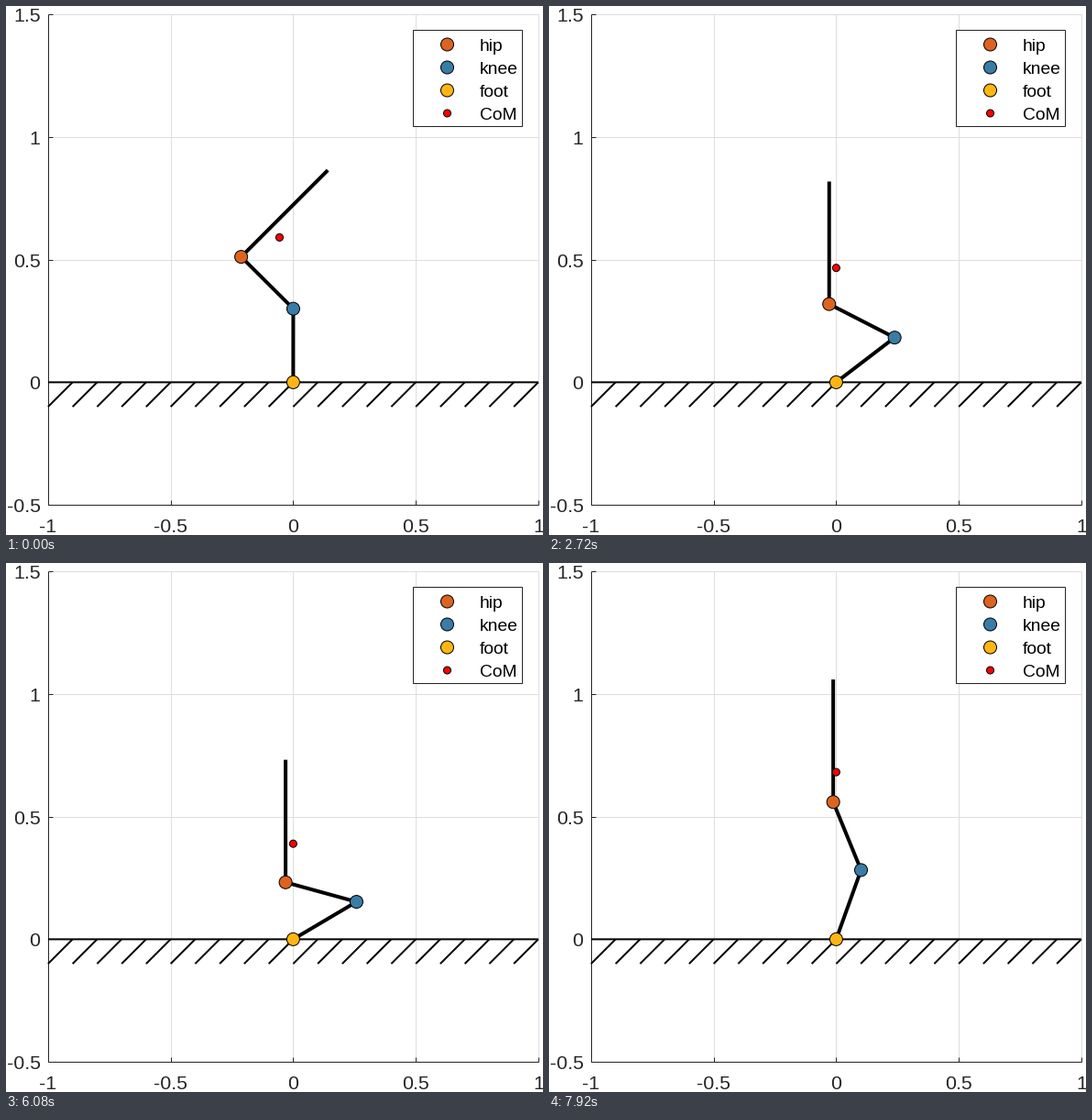
These frames come from a looping animation (586x577 px, 8000 ms). A matplotlib script:

```python
import numpy as np
import matplotlib.pyplot as plt
from matplotlib.animation import FuncAnimation
from matplotlib.patches import Circle, Rectangle

WIDTH, HEIGHT, DPI = 586, 577, 64
FRAMES, INTERVAL = 100, 80
INK = "#262626"
HIP, KNEE, FOOT, COM = "#DC6420", "#3A7CA5", "#FFB512", "#FF0000"

# Link lengths, and how far each link direction carries the centre of mass
SHANK, THIGH, TRUNK = 0.3, 0.3, 0.5
C_SHANK, C_THIGH, C_TRUNK = 0.286, 0.2553, 0.1765

# Phase (degrees) of the squat cycle against time (seconds)
PHASE_T = np.array([0, 0.6, 1.04, 2.72, 3.84, 6.08, 7.36, 7.92])
PHASE = np.array([0, 17, 35.5, 99.6, 142.9, 236.6, 300.7, 335.5])
PHASE_RATE = np.gradient(PHASE, PHASE_T)


def pt(px):
    return px * 72 / DPI


def to_x(x):
    return 313.4 + 267.5 * np.asarray(x)


def to_y(y):
    return 410.4 - 267.3 * np.asarray(y)


def phase(t):
    """Cubic Hermite interpolation of the cycle phase, in radians."""
    i = int(np.clip(np.searchsorted(PHASE_T, t) - 1, 0, len(PHASE_T) - 2))
    h = PHASE_T[i + 1] - PHASE_T[i]
    s = (t - PHASE_T[i]) / h
    deg = ((1 + 2 * s) * (1 - s) ** 2 * PHASE[i]
           + s * (1 - s) ** 2 * h * PHASE_RATE[i]
           + s * s * (3 - 2 * s) * PHASE[i + 1]
           + s * s * (s - 1) * h * PHASE_RATE[i + 1])
    return np.radians(deg)


def settle(t, rate):
    """Critically damped decay from 1 to 0."""
    return (1 + rate * t) * np.exp(-rate * t)


def direction(angle):
    return np.array([np.cos(angle), np.sin(angle)])


def pose(t):
    """Joint positions (foot, knee, hip, head) and centre of mass."""
    com = np.array([-0.0558 * settle(t, 4.1),
                    0.5 + 0.2 * np.cos(phase(t)) - 0.109 * settle(t, 8)])
    trunk = direction(np.pi / 2 - np.pi / 4 * settle(t, 3.75))

    # Two-link inverse kinematics for the legs, knee bent forward
    reach = com - C_TRUNK * trunk
    dist = np.hypot(*reach)
    cos_bend = (C_SHANK**2 + dist**2 - C_THIGH**2) / (2 * C_SHANK * dist)
    shank = direction(np.arctan2(reach[1], reach[0])
                      - np.arccos(np.clip(cos_bend, -1, 1)))
    thigh = reach - C_SHANK * shank
    thigh /= np.hypot(*thigh)

    foot = np.zeros(2)
    knee = foot + SHANK * shank
    hip = knee + THIGH * thigh
    return np.array([foot, knee, hip, hip + TRUNK * trunk]), com


fig = plt.figure(figsize=(WIDTH / DPI, HEIGHT / DPI), dpi=DPI, facecolor="white")
ax = fig.add_axes([0, 0, 1, 1])
ax.set_xlim(0, WIDTH)
ax.set_ylim(HEIGHT, 0)
ax.axis("off")


def stroke(x, y, width, color="black", z=2, snap=None):
    line, = ax.plot(x, y, color=color, lw=pt(width), zorder=z, snap=snap,
                    solid_capstyle="butt", solid_joinstyle="miter")
    return line


def dot(x, y, size, color, z):
    return ax.add_patch(Circle((x, y), size / 2, fc=color, ec="black",
                               lw=pt(1), zorder=z))


def label(x, y, text, size, color, ha):
    ax.text(x, y, text, family="Liberation Sans", fontsize=pt(size),
            color=color, ha=ha, va="baseline", zorder=12)


def draw_axes():
    left, right = to_x([-1, 1])
    bottom, top = to_y([-0.5, 1.5])
    for v in np.arange(-1, 1.01, 0.5):
        x = to_x(v)
        stroke([x, x], [top, bottom], 1, "#DEDEDE", 1)
        stroke([x, x], [bottom, bottom - 5.4], 1, INK)
        label(x, 573.7, f"{v:g}", 21.33, INK, "center")
    for v in np.arange(-0.5, 1.51, 0.5):
        y = to_y(v)
        stroke([left, right], [y, y], 1, "#DEDEDE", 1)
        stroke([left, left + 5.4], [y, y], 1, INK)
        label(37.5, y + 7.9, f"{v:g}", 21.33, INK, "right")
    stroke([left, left], [top, bottom], 1, INK)
    stroke([left, right], [bottom, bottom], 1, INK)


def draw_ground():
    stroke(to_x([-1, 1]), to_y([0, 0]), 2, z=3, snap=False)
    for x in np.linspace(-0.9, 1, 20):
        stroke(to_x([x, x - 0.1]), to_y([0, -0.1]), 2, z=3)


def draw_legend():
    ax.add_patch(Rectangle((444, 26), 119, 105, fc="white", ec=INK,
                           lw=pt(1), zorder=10))
    rows = [("hip", HIP, 14), ("knee", KNEE, 14), ("foot", FOOT, 14), ("CoM", COM, 8)]
    for i, (name, color, size) in enumerate(rows):
        y = 42 + 25 * i
        dot(481.5, y, size, color, 11)
        label(517, y + 6.7, name, 19.2, "black", "left")


draw_axes()
draw_ground()
draw_legend()

body = stroke([], [], 4, z=5)
joints = [dot(0, 0, 14, color, 6) for color in (FOOT, KNEE, HIP)]
com_dot = dot(0, 0, 8, COM, 7)


def update(frame):
    points, com = pose(frame * INTERVAL / 1000)
    xs, ys = to_x(points[:, 0]), to_y(points[:, 1])
    body.set_data(xs, ys)
    for joint, x, y in zip(joints, xs, ys):
        joint.set_center((x, y))
    com_dot.set_center((to_x(com[0]), to_y(com[1])))
    return [body, *joints, com_dot]


anim = FuncAnimation(fig, update, frames=FRAMES, interval=INTERVAL,
                     repeat=True, repeat_delay=0, blit=False)
plt.show()
```
